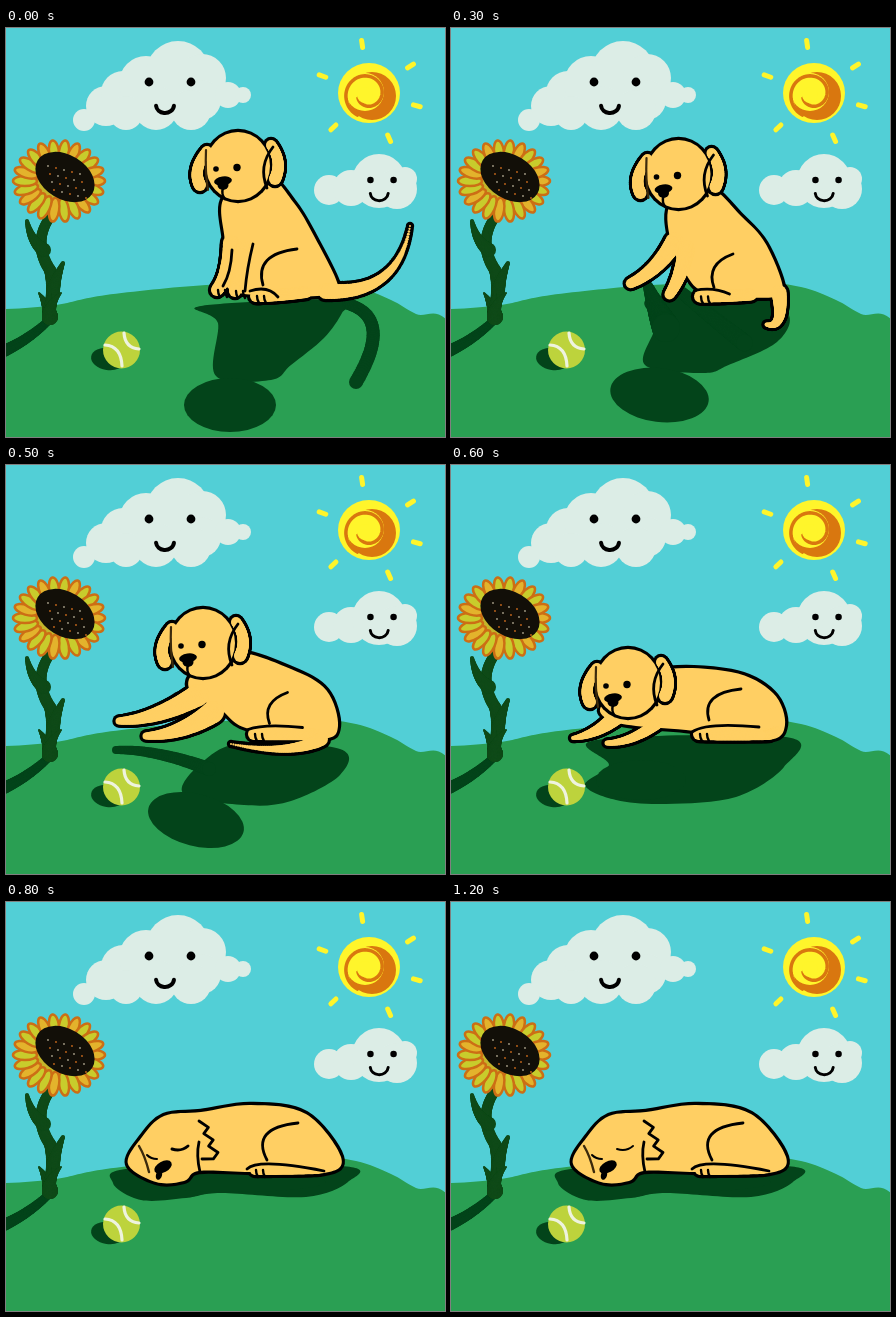
An HTML page with a canvas that plays this animation: 439 px wide and 409 px high, repeating every 1.8 s.

```html
<!DOCTYPE html>
<html lang="en">
<head>
<meta charset="utf-8">
<title>Sleepy puppy</title>
<style>
html, body { margin: 0; width: 100%; height: 100%; overflow: hidden; background: #52cfd6; }
canvas { display: block; }
</style>
</head>
<body>
<canvas id="stage" width="439" height="409"></canvas>
<script>
const ctx = document.getElementById('stage').getContext('2d');
const SKY = '#52cfd6', HILL = '#2a9f53', SHADE = '#03441a', FUR = '#ffcf63', INK = '#000';
const CLOUD = '#dcede6', YELLOW = '#fff52b', ORANGE = '#d9770f', LEAF = '#0f4a18';
const LOOP = 1800, EDGE = 3.2;

function oval(x, y, rx, ry = rx, fill = INK, tilt = 0) {
  ctx.beginPath();
  ctx.ellipse(x, y, rx, ry, tilt, 0, 7);
  ctx.fillStyle = fill;
  ctx.fill();
}

function ink(width, color = INK) {
  ctx.lineWidth = width;
  ctx.strokeStyle = color;
  ctx.stroke();
}

// One bent stroke: start, control, end
function bend([x, y, cx, cy, ex, ey], width = 2.8, color = INK) {
  ctx.beginPath();
  ctx.moveTo(x, y);
  ctx.quadraticCurveTo(cx, cy, ex, ey);
  ink(width, color);
}

// A bent, tapering limb: start, control, end, first and last radius
function limb([x, y, cx, cy, ex, ey, r0, r1], color, grow = 0) {
  for (let i = 0; i <= 50; i++) {
    const t = i / 50, u = 1 - t;
    oval(u * u * x + 2 * u * t * cx + t * t * ex, u * u * y + 2 * u * t * cy + t * t * ey,
      r0 * u + r1 * t + grow, undefined, color);
  }
}

// Smooth closed shape through a few points
function blob(n, fill, width = 0) {
  const len = n.length / 2;
  const at = i => { const k = (i + len) % len * 2; return [n[k], n[k + 1]]; };
  ctx.beginPath();
  ctx.moveTo(...at(0));
  for (let i = 0; i < len; i++) {
    const [a, b, c, d] = [at(i - 1), at(i), at(i + 1), at(i + 2)];
    ctx.bezierCurveTo(b[0] + (c[0] - a[0]) / 6, b[1] + (c[1] - a[1]) / 6,
      c[0] - (d[0] - b[0]) / 6, c[1] - (d[1] - b[1]) / 6, ...c);
  }
  ctx.fillStyle = fill;
  ctx.fill();
  if (width) ink(width);
}

// Blend two poses of the same build
function mix(a, b, t) {
  if (a === undefined) return b;
  if (typeof b === 'number') return a + (b - a) * t;
  if (Array.isArray(b)) return b.map((v, i) => mix(a[i], v, t));
  return Object.fromEntries(Object.keys(b).map(k => [k, mix(a[k], b[k], t)]));
}

function drawSun() {
  oval(363, 65, 31, 30, YELLOW);
  oval(366, 68, 24, 24, ORANGE);
  oval(359, 64, 19, 19, YELLOW);
  ctx.beginPath();
  for (let a = 2; a < 9; a += 0.1) {
    const r = 27 - a * 1.9;
    ctx.lineTo(361 + r * Math.cos(a), 66 + r * Math.sin(a));
  }
  ink(3.5, ORANGE);
  oval(359, 67, 8, 8, YELLOW);
  for (const deg of [-98, -33, 15, 66, 136, 200]) {
    const a = deg * Math.PI / 180, c = Math.cos(a), s = Math.sin(a);
    bend([363 + c * 46, 65 + s * 46, 363 + c * 49, 65 + s * 49, 363 + c * 53, 65 + s * 53], 5, YELLOW);
  }
}

function drawCloud(puffs, [x, y], size) {
  puffs.forEach(([px, py, r]) => oval(px, py, r, r, CLOUD));
  oval(x - 21 * size, y, 4.4 * Math.sqrt(size));
  oval(x + 21 * size, y, 4.4 * Math.sqrt(size));
  ctx.beginPath();
  ctx.ellipse(x - 5 * size, y + 23 * size, 9, 8, 0, 0.1, Math.PI - 0.1);
  ink(4 * Math.sqrt(size));
}

function drawFlower() {
  limb([42, 293, 25, 310, -2, 323, 4, 6], SHADE);
  limb([44, 189, 26, 215, 44, 242, 5, 6], LEAF);
  limb([44, 242, 49, 262, 42, 290, 6, 6], LEAF);
  limb([38, 222, 25, 214, 21, 193, 7, 2], LEAF);
  limb([47, 263, 50, 250, 57, 235, 7, 2], LEAF);
  for (const tip of [33, 44, 55]) limb([44, 289, 42, 278, tip, 265, 8, 1], LEAF);
  oval(53, 153, 36, 32, '#c3b52a');
  for (let i = 0; i < 22; i++) {
    const a = i / 22 * 2 * Math.PI;
    oval(53 + Math.cos(a) * 34, 153 + Math.sin(a) * 29, 12, 5, i % 3 ? '#c8cc2c' : '#e3b32c', a);
    ink(2.5, '#cc6e15');
  }
  oval(59, 149, 32, 22, '#120f08', 0.55);
  for (let i = 0; i < 5; i++) for (let j = 0; j < 4; j++) {
    oval(42 + i * 8 + j * 2, 138 + j * 8 + i * 2, 0.9, 0.9, (i + j) % 2 ? '#c8691c' : '#a8a08a');
  }
}

function drawBall() {
  oval(102, 331, 17, 11, SHADE, 0.15);
  oval(115.5, 322, 18.5, 18.5, '#bdd33c');
  bend([99, 317, 115, 318, 116, 338], 3.2, '#eef3df');
  bend([118, 305, 119, 320, 133, 321], 3.2, '#eef3df');
}

// Limbs: two front legs, hind foot, tail. Folds: thigh, foot, front legs.
const sit = {
  body: [218, 170, 219, 215, 220, 258, 262, 268, 322, 267, 332, 257, 308, 208, 288, 175, 260, 148],
  limbs: [[225, 215, 223, 248, 211, 262, 8, 6], [238, 220, 233, 245, 229, 263, 8, 6],
    [300, 264, 270, 268, 250, 268, 6, 6], [320, 263, 392, 268, 404, 198, 8, 1]],
  folds: [[291, 221, 248, 226, 257, 257], [244, 263, 262, 257, 272, 269],
    [226, 222, 225, 245, 217, 258], [247, 216, 241, 240, 239, 263]],
  toes: [2, 0, 1],
  head: [0, 0],
  shade: {
    body: [195, 278, 212, 295, 210, 348, 265, 352, 285, 337, 318, 310, 336, 285, 338, 272],
    head: [224, 377, 46, 27, 0],
    limbs: [[342, 276, 388, 290, 350, 354, 6, 7]]
  }
};
const droop = {
  ...sit,
  body: sit.body.map((v, i) => i % 2 ? v : v + 2),
  limbs: [...sit.limbs.slice(0, 3), [334, 257, 346, 300, 389, 303, 8, 3]],
  head: [-2, 6],
  shade: { ...sit.shade, limbs: [[338, 272, 350, 310, 384, 312, 8, 8]] }
};
const lean = {
  body: [220, 180, 217, 205, 244, 228, 248, 262, 316, 272, 330, 262, 319, 223, 290, 201, 250, 168],
  limbs: [[222, 212, 190, 238, 148, 249, 10, 3.5], [233, 222, 228, 252, 208, 270, 9, 4],
    [300, 269, 275, 269, 248, 269, 6, 6], [322, 272, 320, 303, 242, 290, 7, 1]],
  folds: [[273, 231, 261, 246, 269, 262], [243, 262, 262, 260, 285, 263]],
  toes: [2],
  head: [-7, 10],
  shade: {
    body: [202, 262, 197, 300, 178, 326, 240, 338, 270, 337, 334, 318, 338, 286, 250, 258],
    head: [193, 357, 53, 27, 0.25],
    limbs: [[122, 256, 165, 263, 203, 318, 4, 9], [197, 258, 205, 280, 215, 300, 5, 14]]
  }
};
const lie = {
  body: [153, 238, 156, 254, 185, 261, 235, 265, 315, 275, 334, 260, 322, 228, 280, 207, 205, 206],
  limbs: [[165, 252, 145, 270, 122, 273, 8, 2], [205, 259, 180, 278, 156, 278, 6, 2.5],
    [318, 269, 280, 270, 248, 269, 6, 6], [325, 265, 320, 270, 310, 270, 4, 4]],
  folds: [[290, 224, 250, 228, 258, 255], [241, 267, 255, 257, 308, 262]],
  toes: [2],
  head: [-55, 80],
  shade: {
    body: [145, 275, 158, 300, 134, 320, 165, 335, 215, 339, 285, 332, 333, 302, 335, 272],
    head: [190, 315, 45, 20, 0],
    limbs: []
  }
};
const between = mix(lean, lie, 0.5);
const sink = {
  ...between,
  limbs: [[192, 230, 150, 255, 113, 256, 11, 3.5], [207, 247, 175, 270, 140, 271, 11, 3.5],
    between.limbs[2], [315, 274, 285, 291, 225, 279, 7, 1]],
  head: [-35, 40],
  shade: {
    body: [240, 278, 200, 294, 177, 328, 238, 340, 285, 336, 334, 310, 334, 284],
    head: [190, 355, 49, 26, 0.25],
    limbs: [[110, 285, 150, 284, 203, 304, 4, 7]]
  }
};
const asleep = {
  body: [122, 262, 136, 235, 158, 214, 195, 210, 245, 203, 300, 212, 335, 255, 318, 271,
    245, 270, 193, 269, 178, 279, 150, 280],
  limbs: [[312, 267, 280, 268, 249, 268, 5, 5]],
  folds: [[292, 221, 244, 226, 261, 258], [241, 267, 252, 256, 318, 269]],
  toes: [0],
  shade: {
    body: [107, 281, 135, 298, 180, 296, 215, 291, 300, 295, 342, 280, 335, 264, 130, 266],
    head: [230, 280, 90, 10, 0],
    limbs: []
  }
};
const poses = [sit, droop, mix(droop, lean, 0.5), lean, sink, lie];

function drawHead([dx, dy]) {
  const ears = [[201, 123, 186, 142, 194, 157, 5, 6], [265, 117, 277, 134, 269, 151, 5, 6]];
  ctx.save();
  ctx.translate(dx, dy);
  for (const [color, grow] of [[INK, EDGE], [FUR, 0]]) {
    ears.forEach(ear => limb(ear, color, grow));
    oval(232, 138, 32 + grow, 34 + grow, color);
  }
  bend([200, 122, 199, 145, 202, 162], 2.2, '#3c2a0c');
  bend([267, 119, 252, 138, 261, 160]);
  oval(217, 153, 9, 4.5, INK, -0.15);
  oval(217, 157, 5.5, 5);
  bend([217, 160, 215, 166, 219, 171], 2.4);
  oval(210, 141, 2.8);
  oval(231, 139.5, 3.7);
  ctx.restore();
}

function drawSleepingFace(step) {
  bend([133, 244, 139, 254, 143, 270], 2.4, '#3c2a0c');
  ctx.beginPath();
  for (let i = 0; i < 7; i++) ctx.lineTo(195 + i * 2.4 + (i % 2 ? 5 : -2), 219 + i * 6.3);
  ctx.lineTo(196, 257);
  ink(2.8);
  bend([193, 240, 190, 253, 194, 270]);
  oval(157, 265, 9.5, 5.5, INK, -0.5);
  oval(153, 273, 3, 5, INK, 0.3);
  if (step === 0) { // not quite shut yet
    oval(146, 254, 3.4, 2.4);
    oval(174, 246, 3.8, 2.6);
  }
  bend([141, 253, 145, 257, 151, 257], 2);
  bend([166, 247, 175, 250, 182, 244], 3.2 - step * 0.25);
}

function drawDog({ shade, body, limbs, folds, toes }) {
  blob(shade.body, SHADE);
  const [x, y, rx, ry, tilt] = shade.head;
  oval(x, y, rx, ry, SHADE, tilt);
  shade.limbs.forEach(l => limb(l, SHADE));
  blob(body, INK, EDGE * 2);
  limbs.forEach(l => limb(l, INK, EDGE));
  blob(body, FUR);
  limbs.forEach(l => limb(l, FUR));
  folds.forEach(f => bend(f));
  for (const n of toes) {
    const [px, py] = limbs[n].slice(4);
    for (const k of [1, 8]) bend([px + k, py, px + k, py + 4, px + k + 2, py + 7], 2.4);
  }
}

function drawLand() {
  blob([-60, 281, 0, 281, 50, 277, 100, 267, 200, 257, 300, 254, 350, 259, 385, 272,
    410, 286, 450, 304, 520, 470, -60, 470], HILL);
}

const bigPuffs = [[78, 92, 11], [100, 78, 20], [117, 65, 22], [140, 55, 27], [172, 45, 32],
  [196, 50, 24], [195, 72, 20], [222, 67, 13], [237, 67, 8], [150, 80, 22], [185, 82, 20], [120, 85, 17]];
const smallPuffs = [[323, 162, 15], [345, 160, 18], [373, 153, 27], [391, 161, 20], [399, 151, 12]];

function draw(now) {
  const t = now % LOOP;
  const step = t < 200 ? 0 : Math.min(11, Math.floor(t / 100) - 1);
  ctx.lineCap = ctx.lineJoin = 'round';
  ctx.fillStyle = SKY;
  ctx.fillRect(0, 0, 439, 409);
  drawSun();
  drawCloud(bigPuffs, [164, 54], 1);
  drawCloud(smallPuffs, [376, 152], 0.55);
  drawLand();
  drawFlower();
  if (step < poses.length) {
    drawDog(poses[step]);
    drawHead(poses[step].head);
  } else {
    drawDog(asleep);
    drawSleepingFace(step - poses.length);
  }
  drawBall();
  requestAnimationFrame(() => draw(performance.now() - start));
}

const start = performance.now();
draw(0);
</script>
</body>
</html>
```
